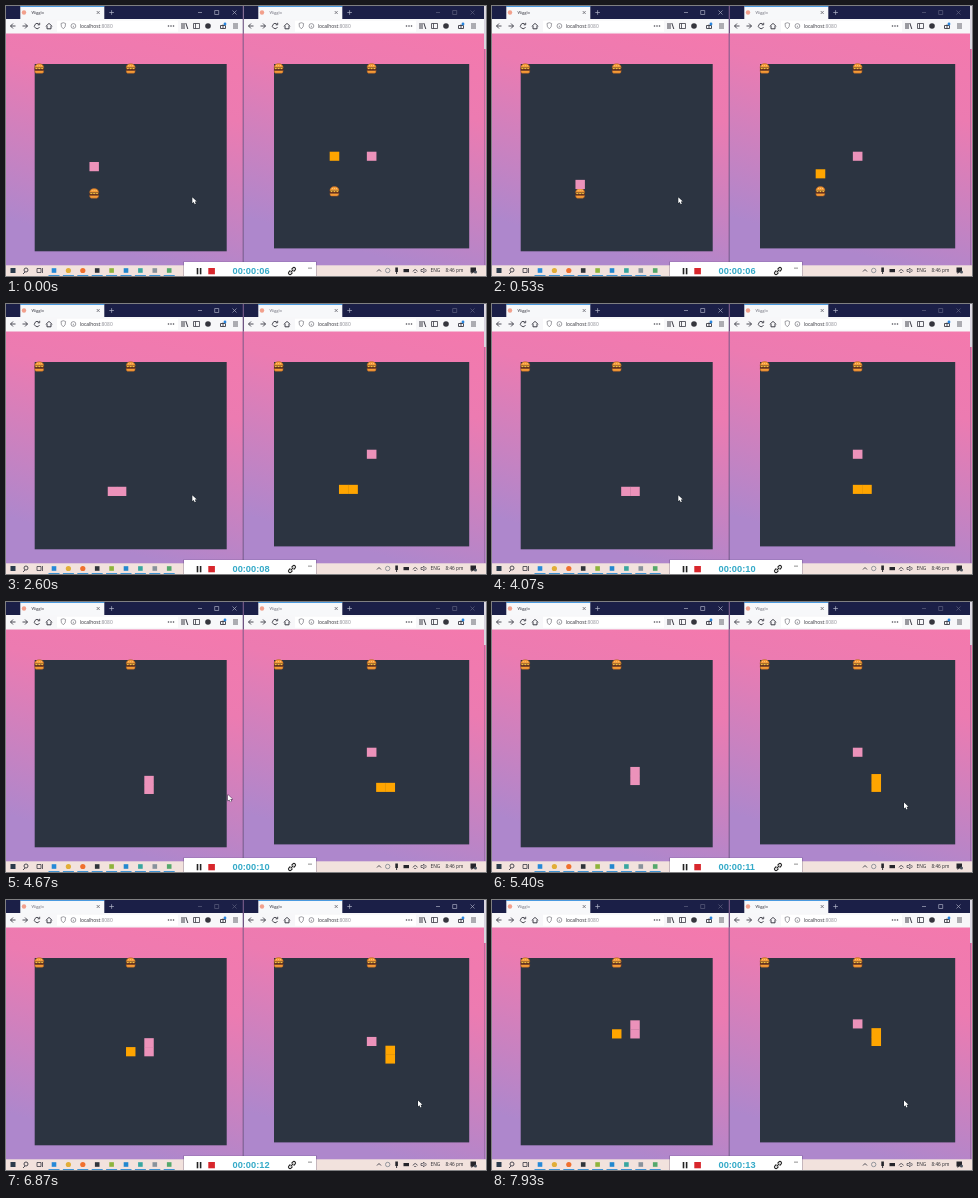
These frames come from a looping animation (480x270 px, 8 s). An HTML page with a canvas:

```html
<!DOCTYPE html>
<html lang="en">
<head>
<meta charset="utf-8">
<title>Two-player worm game</title>
<style>
html, body { margin: 0; width: 100%; height: 100%; overflow: hidden; }
canvas { display: block; }
</style>
</head>
<body>
<canvas id="stage" width="480" height="270"></canvas>
<script>
const ctx = document.getElementById('stage').getContext('2d');
const LOOP = 8000, GRID = 21;
const TICKS = [70, 530, 1070, 1530, 2070, 2600, 3070, 3530, 4070, 4530, 5070, 5600, 6070, 6600, 7070, 7600];
const SECONDS = [1470, 2070, 3070, 4070, 5070, 6070, 7070];
const FOCUS_SWITCH = 5670, JOIN_TICK = 14;
const PINK = '#ec92ba', ORANGE = '#ffa500', INK = '#3c3c46';
const SANS = '"Open Sans", "Noto Sans", sans-serif';
const LEFT = { x: 28.7, y: 58, w: 192, h: 187.3 };
const RIGHT = { x: 268, y: 58, w: 195.2, h: 184.4 };

function rect(x, y, w, h, color) {
  ctx.fillStyle = color;
  ctx.fillRect(x, y, w, h);
}
function disc(x, y, r, color) {
  ctx.fillStyle = color;
  ctx.beginPath();
  ctx.arc(x, y, r, 0, 7);
  ctx.fill();
}
function stroke(path, color = INK, width = 0.9) {
  ctx.strokeStyle = color;
  ctx.lineWidth = width;
  ctx.stroke(new Path2D(path));
}
function fill(path, color) {
  ctx.fillStyle = color;
  ctx.fill(new Path2D(path));
}
function text(str, x, y, size, color, font = SANS, weight = '') {
  ctx.font = `${weight} ${size}px ${font}`;
  ctx.fillStyle = color;
  ctx.fillText(str, x, y);
}
function at(x, y, draw) {
  ctx.save();
  ctx.translate(x, y);
  draw();
  ctx.restore();
}
const passed = (times, t) => times.filter(s => t >= s).length;

// Head of the first worm after n ticks: down, right, then up
function head(n) {
  if (n <= 3) return [6, 11 + n];
  if (n <= 9) return [n + 3, 14];
  return [12, 23 - n];
}
function cell(board, [col, row], color) {
  const w = board.w / GRID, h = board.h / GRID;
  rect(board.x + col * w - 0.1, board.y + row * h - 0.1, w + 0.3, h + 0.3, color);
}
function worm(board, n, color) {
  if (n >= 3) cell(board, head(n - 1), color);
  cell(board, head(n), color);
}
function burger(board, col, row) {
  const x = board.x + (col + 0.5) * board.w / GRID;
  const y = board.y + (row + 0.5) * board.h / GRID;
  at(x, y, () => {
    const bun = 'M-4.5-.6C-4.8-6.2 4.8-6.2 4.5-.6Z';
    const base = 'M-4.5 2H4.5Q4.6 4.8 2.8 4.8H-2.8Q-4.6 4.8-4.5 2Z';
    for (const part of [bun, base]) {
      fill(part, '#f59b36');
      stroke(part, '#a85a24', 0.5);
    }
    rect(-4.7, -0.9, 9.4, 2.9, '#63301f');
    fill('M-4.7-.7H4.7L3 .9 1.4-.2 0 .9-1.4-.2-3 .9Z', '#f6c544');
    for (const dx of [-2, 0, 2]) rect(dx - 0.4, -3.1, 0.8, 0.8, '#ffdf9c');
  });
}

function chrome(x, width, focused) {
  const control = focused ? '#a9acc2' : '#5d617f';
  at(x, 0, () => {
    rect(0, 0, width, 14, '#1b1f47');
    rect(14.3, 0.6, 84, 13.4, '#f7f8fa');
    rect(14.3, 0, 84, 1, '#4a9ae0');
    disc(18, 6.5, 2.2, '#f2a08c');
    text('Wigglo', 25.4, 8.4, 4, focused ? '#33333d' : '#70707c');
    stroke('M90.7 5l3 3m0-3l-3 3', '#55555f', 0.7);
    stroke('M103.3 6.5h4.6M105.6 4.2v4.6', '#b4b8cc', 0.7);
    stroke('M192 6.5h4M208.7 4.5h4v4h-4zM226.5 4.5l4 4m0-4l-4 4', control, 0.7);

    rect(0, 13, width, 14.5, '#f7f7f9');
    rect(51, 14.8, 121, 11, '#ffffff');
    stroke('M9.5 20H4.5m2.5-2.5L4.5 20l2.5 2.5');
    stroke('M16.5 20h5m-2.5-2.5l2.5 2.5-2.5 2.5');
    stroke('M33 18.3a2.6 2.6 0 1 0 .5 2.7M33.7 16.8v2h-2');
    stroke('M40 20.3l3-3 3 3M41 20v2.8h4V20', INK, 1);
    stroke('M55 17.5l2.3-.8 2.3.8q.2 4-2.3 5.3-2.5-1.3-2.3-5.3z', '#77777f', 0.7);
    stroke('M65 20a2.4 2.4 0 1 0 4.8 0a2.4 2.4 0 1 0-4.8 0M67.4 19.7v1.6', '#77777f', 0.7);
    text('localhost', 73.7, 21.9, 4.9, '#2a2a32');
    const host = ctx.measureText('localhost').width;
    text(':8080', 73.7 + host, 21.9, 4.9, '#8a8a92');
    for (const dx of [162.5, 165, 167.5]) disc(dx, 20, 0.8, '#4a4a52');
    stroke('M176 17v6M178 17v6M179.8 17l2 6', INK, 1);
    stroke('M187.5 17.5h6v5h-6zM189.5 17.5v5', INK, 0.8);
    disc(202, 20, 2.8, '#35353d');
    stroke('M214.5 19.5h5v3h-5zM217 18.5v4', INK, 0.9);
    disc(219, 18, 1.4, '#2785df');
    stroke('M227 18h5M227 20h5M227 22h5', INK, 0.8);
  });
}

function page(x, width, board) {
  const sky = ctx.createLinearGradient(x + width, 27, x + width - 70, 262);
  sky.addColorStop(0, '#f479ad');
  sky.addColorStop(0.35, '#ec7bb1');
  sky.addColorStop(1, '#ae87cc');
  rect(x, 27, width, 233, sky);
  rect(board.x, board.y, board.w, board.h, '#2c3441');
}

function taskbar() {
  rect(0, 259.3, 480, 11, '#f2e2dd');
  rect(4.5, 262, 5, 5, '#2b3b4c');
  stroke('M18 264a2 2 0 1 0 4 0a2 2 0 1 0-4 0M19 266l-2 2', INK);
  stroke('M31 262.5h4v4h-4zM36.5 262v5', INK, 0.8);
  const apps = ['#2689d8', '#e2ae38', '#f0702e', '#30343a', '#8eb43c', '#2388cf', '#38a6a0', '#88929c', '#55a86c'];
  apps.forEach((color, i) => {
    const x = 48 + i * 14.4;
    if (i === 1 || i === 2) disc(x, 264.5, 2.6, color);
    else rect(x - 2.3, 262.2, 4.6, 4.6, color);
    rect(x - 5.5, 269, 11, 1, '#3f93d2');
  });
  stroke('M371 265.5l2-2 2 2');
  stroke('M379.5 264.5a2.2 2.2 0 1 0 4.4 0a2.2 2.2 0 1 0-4.4 0', '#888e96');
  rect(389.3, 261.5, 2.6, 4.5, '#25252b');
  stroke('M390.6 266v2', '#25252b');
  rect(397.5, 263, 5.5, 3.2, '#25252b');
  stroke('M407 265.5q2.2-4 4.4 0M408.2 267q1-2 2 0', INK, 0.8);
  stroke('M415 263.5h1.5l1.5-1.5v5l-1.5-1.5H415zM419.5 263q1.3 1.5 0 3', INK, 0.7);
  text('ENG', 424.5, 266.4, 4.8, '#25252b');
  text('8:46 pm', 439.5, 266.4, 4.7, '#25252b');
  fill('M464.5 261.5h5.5v5h-3l-1.5 1.5v-1.5h-1z', '#25252b');
  disc(469.5, 266, 1.5, '#4d5560');
}

function recorder(t) {
  const sec = 6 + passed(SECONDS, t);
  rect(177, 255.5, 134, 15, 'rgba(60,50,90,.25)');
  rect(178, 256, 132, 14, '#ffffff');
  rect(190.7, 262, 1.6, 6.3, '#222');
  rect(193.8, 262, 1.6, 6.3, '#222');
  rect(202.3, 262, 6.6, 6.3, '#d8262c');
  text('00:00:' + String(sec).padStart(2, '0'), 226.5, 268.3, 9.25, '#35aac8',
    '"Liberation Sans", Arial, sans-serif', 'bold');
  at(286, 265, () => {
    ctx.rotate(-Math.PI / 4);
    stroke('M-.8-1.5h-2a1.5 1.5 0 0 0 0 3h2M.8-1.5h2a1.5 1.5 0 0 1 0 3h-2M-1.8 0h3.6', '#222', 1.1);
  });
  rect(302, 261.7, 4, 0.8, '#777');
}

function cursor(t) {
  const p = Math.min(1, Math.max(0, (t - 4470) / 800));
  const e = p * p * (3 - 2 * p);
  at(186.3 + 225.7 * e, 191.3 + 9.2 * e, () => {
    const arrow = 'M0 0V6l1.4-1.3 1 2.2 1.1-.5-1-2.1h2z';
    stroke(arrow, '#111820', 0.8);
    fill(arrow, '#ffffff');
  });
}

function draw(t) {
  const n = passed(TICKS, t);
  const rightFocus = t >= FOCUS_SWITCH;
  page(0, 237, LEFT);
  page(237, 243, RIGHT);
  chrome(0, 237, !rightFocus);
  chrome(238, 242, rightFocus);
  rect(236.5, 0, 1.5, 259.3, 'rgba(110,85,130,.6)');
  rect(478, 0, 2, 43, '#d9d5df');
  rect(478, 43, 1, 216, 'rgba(110,85,130,.4)');

  for (const board of [LEFT, RIGHT]) {
    burger(board, 0, 0);
    burger(board, 10, 0);
  }
  if (n < 3) burger(LEFT, 6, 14);
  if (n < 4) burger(RIGHT, 6, 14);

  // The opponent's worm is always one tick late
  worm(LEFT, n, PINK);
  worm(RIGHT, n - 1, ORANGE);
  const moves = n - JOIN_TICK + 1;
  cell(RIGHT, [10, 10 - Math.max(0, moves)], PINK);
  if (moves > 0) cell(LEFT, [10, 11 - moves], ORANGE);

  taskbar();
  recorder(t);
  cursor(t);
}

const start = performance.now();
function tick() {
  draw((performance.now() - start) % LOOP);
  requestAnimationFrame(tick);
}
tick();
</script>
</body>
</html>
```
